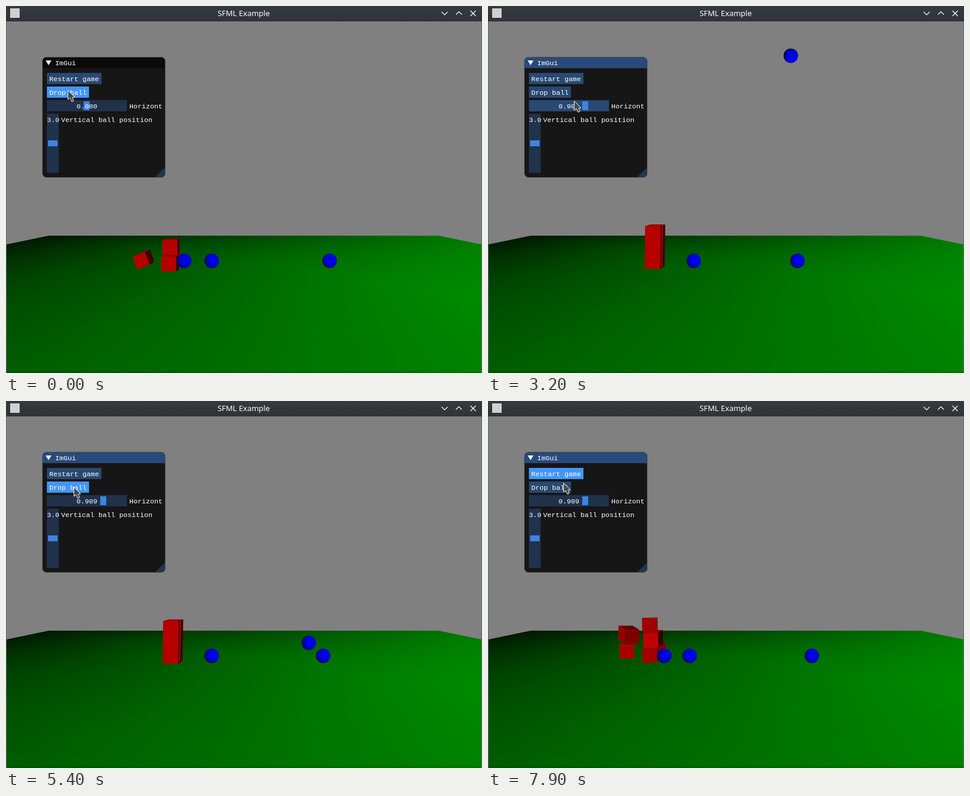
These frames come from a looping animation (803 by 620 pixels, 8 s). An HTML page with a canvas:

```html
<!DOCTYPE html>
<html lang="en">
<head>
<meta charset="utf-8">
<title>SFML Example</title>
<style>
  html, body { margin: 0; width: 100%; height: 100%; overflow: hidden; background: #808080; }
  canvas { display: block; }
</style>
</head>
<body>
<canvas id="stage" width="803" height="620"></canvas>
<script>
const ctx = document.getElementById('stage').getContext('2d');
const LOOP = 8000, STEP = 100;
const RESTART = 1080, GRAB = 1600, RELEASE = 2700;
const DROP = 3692, REDROP = 4660, RESTART2 = 6160, CLIMB = 7300, TOPPLE = 7430;
const FALL = 740, GRAVITY = 593, TOP = 84, FLOOR = 430.5;
const DIAMETER = 24, STILL_X = 347;

const clamp = v => Math.max(0, Math.min(1, v));
const lerp = (a, b, p) => a + (b - a) * p;
const span = (t, from, to) => clamp((t - from) / (to - from));
const easeOut = p => 1 - (1 - clamp(p)) ** 2;
const smooth = p => p * p * (3 - 2 * p);

function rect(color, x, y, w, h) {
  ctx.fillStyle = color;
  ctx.fillRect(x, y, w, h);
}

function trace(points, closed = true) {
  ctx.beginPath();
  points.forEach(([x, y]) => ctx.lineTo(x, y));
  if (closed) ctx.closePath();
}

function poly(color, ...points) {
  trace(points);
  ctx.fillStyle = color;
  ctx.fill();
}

function label(text, x, y) {
  ctx.font = '11.667px "Liberation Mono", monospace';
  ctx.textAlign = 'left';
  ctx.fillStyle = '#fff';
  ctx.fillText(text, x, y);
}

// ---- Motion ----

// Each move: start, end, and the point reached.
const MOVES = [
  [0, 100, 103, 142], [500, 800, 112, 123], [1200, 1600, 140, 168],
  [1900, 2600, 164, 168], [2980, 3500, 115, 147], [3700, 4500, 114, 145],
  [5400, 6000, 123, 123], [7000, 7200, 118, 146], [7400, 7700, 125, 108],
  [7700, 7900, 127, 138]
];

function cursorAt(t) {
  let x = 104, y = 142;
  for (const [from, to, toX, toY] of MOVES) {
    const p = smooth(span(t, from, to));
    x = lerp(x, toX, p);
    y = lerp(y, toY, p);
  }
  return [Math.round(x), Math.round(y)];
}

function sliderValue(t) {
  if (t < GRAB) return 0;
  return (cursorAt(Math.min(t, RELEASE))[0] - 136.5) / 30.25;
}

const drop = ms => TOP + GRAVITY * (ms / 1000) ** 2;

function rebound(x, ms) {
  const s = (ms - FALL) / 1000;
  if (s < 0) return [x, drop(ms)];
  return [x - 412 * s, 409 - 243 * s + GRAVITY * s * s];
}

// Rolls over the resting ball, then along the floor.
function climb(t) {
  const x = lerp(345.5, 297.5, easeOut(span(t, CLIMB, 7900)));
  const rise = Math.sqrt(Math.max(0, DIAMETER ** 2 - (x - STILL_X) ** 2));
  return [x, FLOOR - rise];
}

function droppedBall(t) {
  const x = 401.3 + 120.5 * sliderValue(t);
  if (t < RESTART) return [300.5, FLOOR];
  if (t < GRAB) return [x, drop(t - RESTART)];
  if (t < DROP) return [x, TOP];
  if (t < REDROP) return rebound(x, t - DROP);
  if (t < RESTART2) return [x, Math.min(FLOOR, drop(t - REDROP))];
  return t < CLIMB ? rebound(x - 0.5, t - RESTART2) : climb(t);
}

function struckBall(t) {
  if (t < RESTART) return 546;
  if (t < RESTART2) return 522 + 13 * easeOut((t - DROP - FALL) / 300);
  return 522 + 24.3 * easeOut((t - RESTART2 - FALL) / 420);
}

// ---- Scene ----

// Two flat triangles in perspective, shaded linearly from their corners.
function ground() {
  const horizon = 319.5, center = 401, halfWidth = 4.8;
  const far = 1 / 68.5, near = 0.0029;
  ctx.save();
  trace([[0, 403], [72, 388], [730, 388], [803, 403], [803, 620], [0, 620]]);
  ctx.clip();
  for (let y = 388; y < 620; y++) {
    const depth = y + 0.5 - horizon;
    const v = (far - 1 / depth) / (far - near);
    const across = x => ((x - center) / depth / halfWidth + 1) / 2;
    const crease = center + (2 * v - 1) * halfWidth * depth;
    const shade = ctx.createLinearGradient(0, 0, 803, 0);
    for (const x of [0, Math.max(0, Math.min(803, crease)), 803]) {
      const u = across(x);
      const g = 22 + (u > v ? 90 * u + 68 * v : 136 * u + 22 * v);
      shade.addColorStop(x / 803, `rgb(0,${Math.round(g)},0)`);
    }
    rect(shade, 0, y, 803, 1);
  }
  rect('rgba(0,0,0,.12)', 0, 617, 803, 3);
  ctx.restore();
}

function ball(x, y) {
  const lightY = lerp(3, -2, span(y, TOP, FLOOR));
  const shade = ctx.createRadialGradient(x + 3, y + lightY, 1, x + 2, y + lightY / 2, 14.5);
  shade.addColorStop(0, '#0000f4');
  shade.addColorStop(0.5, '#0000e0');
  shade.addColorStop(0.8, '#00009c');
  shade.addColorStop(1, '#000038');
  ctx.beginPath();
  ctx.arc(x, y, 12.2, 0, 2 * Math.PI);
  ctx.fillStyle = shade;
  ctx.fill();
}

const red = v => `rgb(${Math.round(v)},0,0)`;

// Front face plus the side and top faces seen along the depth offset.
function cube(x, y, { size = 25, turn = 0, depth = 5, front = 182, side = 60 } = {}) {
  const h = size / 2, c = Math.cos(turn) * h, s = Math.sin(turn) * h;
  const nw = [x - c + s, y - s - c], ne = [x + c + s, y + s - c];
  const se = [x + c - s, y + s + c], sw = [x - c - s, y - s + c];
  const back = ([px, py]) => [px + depth, py - Math.abs(depth) * 0.6];
  const [a, b] = depth < 0 ? [nw, sw] : [ne, se];
  poly(red(front * 0.8), nw, ne, back(ne), back(nw));
  poly(red(side), a, b, back(b), back(a));
  poly(red(front), nw, ne, se, sw);
}

function fallen() {
  cube(281.5, 427, { depth: 0, front: 150 });
  cube(274.5, 436);
  cube(276.5, 408, { depth: 4 });
  cube(228, 430.5, { size: 22.5, turn: -0.36, depth: 8 });
}

// The rear stack creeps into view behind the front one.
function tower(t) {
  const again = t >= RESTART2;
  const creep = again ? 0 : span(t, 1900, 3200);
  const left = 267 - 2 * creep - again, right = 292 - creep, bottom = 445 - creep;
  const far = again ? lerp(298, 296, span(t, RESTART2, CLIMB)) : 298 + creep;
  const strip = 2 * creep;
  poly('#940000', [left, 372], [left + 9, 369], [far, 369], [right, 372]);
  poly('#400000', [right, 371.5], [far, 369], [far - 1, bottom - 5], [right - 1, bottom]);
  poly('#a40000', [right + 2, 371], [right + 2 + strip, 370],
    [right + 1 + strip, bottom - 4], [right + 1, bottom - 4]);
  poly('#b60000', [left, 372], [right, 371], [right - 1, bottom], [left - 0.5, bottom]);
}

function scatter(p) {
  const rear = [[243, 398], [234, 423], [288, 421]];
  rear.forEach(([x, y], row) => cube(
    lerp(280, x, p), lerp(384 + 24 * row, y, p),
    { size: 24, depth: row ? 1 : lerp(5, -11, p), front: lerp(182, row === 1 ? 168 : 125, p), side: 150 }
  ));
  for (let row = 2; row >= 0; row--) {
    const middle = row === 1;
    cube(lerp(279, 272.5 + 2 * middle, p), 384 + 24 * row - p * (5 - 1.5 * row), {
      turn: -0.03 * p, depth: middle ? lerp(5, 8, p) : lerp(5, 1, p),
      front: lerp(182, middle ? 192 : 160, p), side: 52
    });
  }
}

function cubes(t) {
  if (t < RESTART) fallen();
  else if (t < TOPPLE) tower(t);
  else scatter(easeOut(span(t, TOPPLE, 7900)));
}

// ---- Interface ----

function titleBar() {
  const shade = ctx.createLinearGradient(0, 0, 0, 26);
  shade.addColorStop(0, '#353b40');
  shade.addColorStop(1, '#2e3338');
  rect(shade, 0, 0, 803, 26);
  rect('#d0d0d0', 7, 4, 16, 16);
  ctx.font = '13px "Noto Sans", sans-serif';
  ctx.textAlign = 'center';
  ctx.fillStyle = '#fcfcfc';
  ctx.fillText('SFML Example', 401, 17);
  ctx.strokeStyle = '#fcfcfc';
  ctx.lineWidth = 1.2;
  const lines = [
    [[735, 10], [740, 15], [745, 10]], [[759, 14.5], [764, 9.5], [769, 14.5]],
    [[783.5, 8], [792.5, 17]], [[783.5, 17], [792.5, 8]]
  ];
  lines.forEach(points => { trace(points, false); ctx.stroke(); });
}

function button(text, y, width, hot) {
  rect(hot ? '#4296fa' : '#284971', 69, y, width, 19);
  label(text, 73, y + 14);
}

function panelFrame(title) {
  ctx.save();
  ctx.beginPath();
  ctx.roundRect(61.5, 86.5, 207, 203, 7);
  ctx.fillStyle = '#161616';
  ctx.fill();
  ctx.strokeStyle = '#46464c';
  ctx.lineWidth = 1;
  ctx.stroke();
  ctx.clip();
  rect(title, 62, 87, 206, 18);
  poly('#21364f', [268, 273], [268, 289], [252, 289]);
  ctx.restore();
}

// Hover colours follow the cursor one step late.
function panel(t) {
  const [hx, hy] = cursorAt(t - STEP);
  const dragging = t >= GRAB && t < RELEASE;
  const over = (y, w) => !dragging && hx >= 69 && hx < 69 + w && hy >= y && hy < y + 19;
  const value = sliderValue(t);

  panelFrame(t < 1000 ? '#0a0a0a' : '#294a7a');
  poly('#fff', [67, 92], [76.5, 92], [71.75, 100]);
  label('ImGui', 83, 100);
  button('Restart game', 113, 92, over(113, 92));
  button('Drop ball', 136, 71, over(136, 71));

  rect(dragging ? '#336caf' : over(159, 135) ? '#284971' : '#20324c', 69, 159, 135, 19);
  rect(dragging ? '#4296fa' : '#3d85e0', Math.round(131 + value * 30.25), 161, 10, 15);
  label(value.toFixed(3), 119, 173);
  label('Horizont', 208, 173);

  rect('#20324c', 69, 182, 20, 100);
  rect('#3d85e0', 71, 227, 16, 10);
  label('3.0', 69, 196);
  label('Vertical ball position', 93, 196);
}

function pointer([x, y]) {
  ctx.save();
  ctx.translate(x + 0.5, y + 0.5);
  trace([[0, 0], [0, 15.5], [3.6, 13], [6.5, 19], [9.6, 17.5], [7.5, 12], [11.5, 11.5]]);
  ctx.fillStyle = '#484848';
  ctx.fill();
  ctx.strokeStyle = '#f0f0f0';
  ctx.lineWidth = 1;
  ctx.lineJoin = 'round';
  ctx.stroke();
  ctx.restore();
}

function draw(t) {
  rect('#808080', 0, 0, 803, 620);
  ground();
  cubes(t);
  ball(lerp(STILL_X, 340, span(t, TOPPLE, 7900)), FLOOR);
  ball(struckBall(t), FLOOR);
  ball(...droppedBall(t));
  rect('#566270', 0, 26, 1, 594);
  rect('#566270', 802, 26, 1, 594);
  titleBar();
  panel(t);
  pointer(cursorAt(t));
}

const began = performance.now();
function tick() {
  const t = (performance.now() - began) % LOOP;
  draw(Math.floor(t / STEP) * STEP);
  requestAnimationFrame(tick);
}
tick();
</script>
</body>
</html>
```
